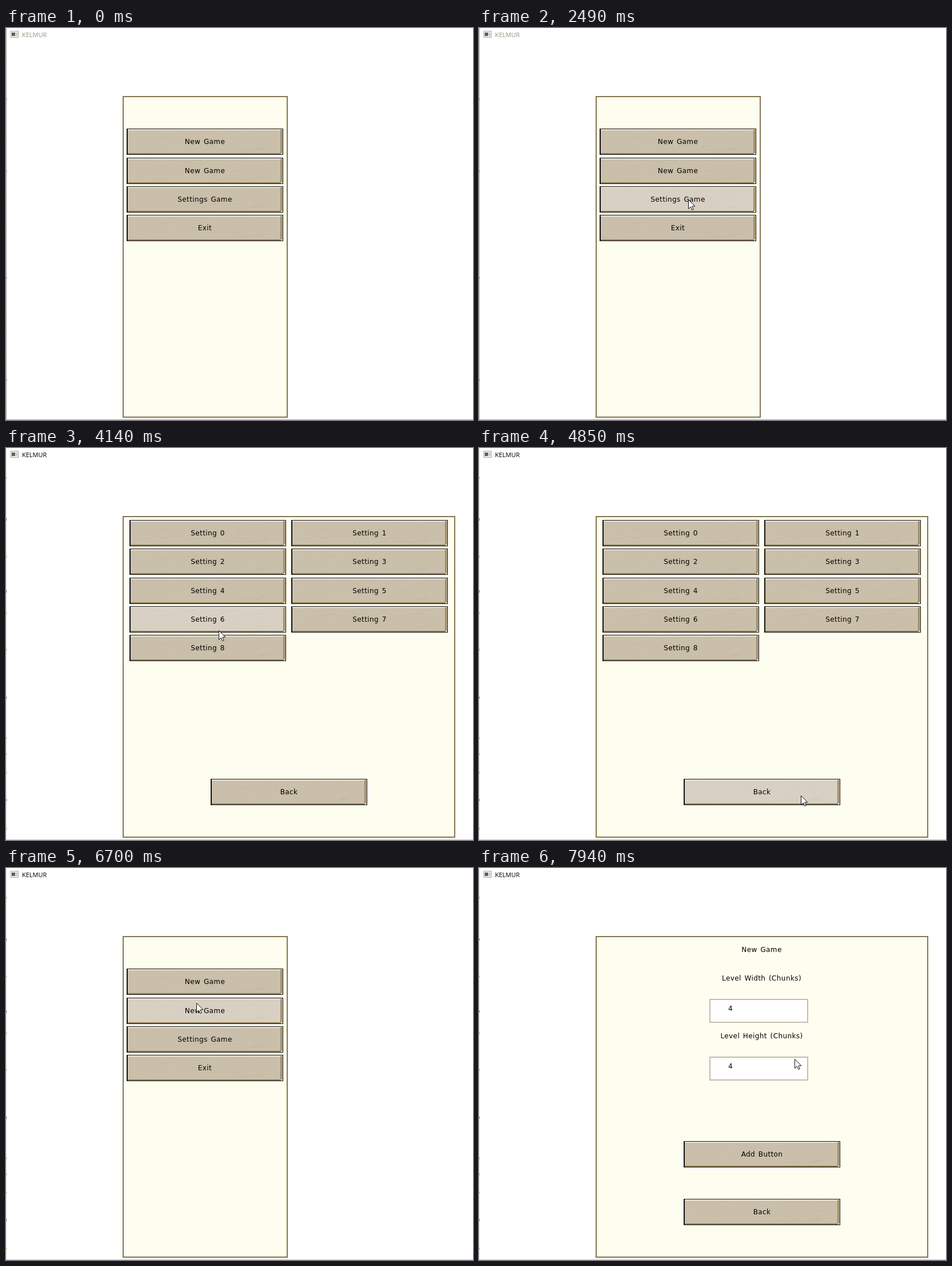
An HTML page with a canvas that plays this animation: 817x686 px, repeating every 7.99 s.

```html
<!DOCTYPE html>
<html lang="en">
<head>
<meta charset="utf-8">
<title>Game menu</title>
<style>
  html, body { margin: 0; width: 100%; height: 100%; overflow: hidden; background: #fff; }
  canvas { display: block; }
</style>
</head>
<body>
<canvas id="stage" width="817" height="686"></canvas>
<script>
const LOOP = 7990;
const FOCUS = 2630, OPEN_SETTINGS = 3880, GO_BACK = 5370, OPEN_NEW_GAME = 7110;
const BUTTON_W = 274, BUTTON_H = 46;
const MENU_X = 211, LEFT_X = 216, RIGHT_X = 499, CENTER_X = 358;
const ctx = document.getElementById('stage').getContext('2d');

function seeded(seed) {
  return () => (seed = seed * 16807 % 2147483647) / 2147483647;
}

function rect(c, color, x, y, w, h) {
  c.fillStyle = color;
  c.fillRect(x, y, w, h);
}

function label(text, x, y) {
  ctx.font = '12px "DejaVu Sans", sans-serif';
  ctx.letterSpacing = '0.4px';
  ctx.wordSpacing = '1.5px';
  ctx.textAlign = 'center';
  ctx.fillStyle = '#000';
  ctx.fillText(text, x, y);
}

// Wooden plate with black outline and bevelled right and bottom edges.
function makePlate(wood, grain) {
  const plate = document.createElement('canvas');
  plate.width = BUTTON_W;
  plate.height = BUTTON_H;
  const c = plate.getContext('2d');
  const random = seeded(7);
  const right = BUTTON_W - 5, bottom = BUTTON_H - 3;

  rect(c, '#111', 0, 0, BUTTON_W, BUTTON_H);
  rect(c, wood, 2, 1, BUTTON_W - 3, BUTTON_H - 2);
  c.strokeStyle = grain;
  for (let i = 0; i < 80; i++) {
    const x = 4 + random() * 245, y = 5 + random() * 37, length = 5 + random() * 15;
    c.globalAlpha = 0.05 + random() * 0.15;
    c.beginPath();
    c.moveTo(x, y);
    c.lineTo(x + length, y - length * 0.1);
    c.stroke();
  }
  c.globalAlpha = 1;
  rect(c, '#e9e4d9', 2, 1, BUTTON_W - 4, 2);
  rect(c, '#8c7950', 2, bottom, BUTTON_W - 4, 2);
  rect(c, '#a08d69', right, 2, 3, BUTTON_H - 4);
  rect(c, '#f4f0e4', right + 1, bottom, 2, 2);
  return plate;
}

const plainPlate = makePlate('#cabfaa', '#b3a68d');
const hoverPlate = makePlate('#d8d0c2', '#c3b9a8');

function button(text, x, row, pointer) {
  const y = Math.floor(126.5 + 50.33 * row);
  const hovered = pointer && pointer.x >= x && pointer.x < x + BUTTON_W &&
    pointer.y >= y && pointer.y < y + BUTTON_H;
  ctx.drawImage(hovered ? hoverPlate : plainPlate, x, y);
  label(text, x + BUTTON_W / 2, y + 27);
}

function panel(width) {
  rect(ctx, '#85754f', 204, 119, width, 563);
  rect(ctx, '#fefef0', 206, 121, width - 4, 559);
}

function input(caption, value, y) {
  label(caption, 494.5, y - 32);
  rect(ctx, '#c4bbae', 403, y, 173, 42);
  rect(ctx, '#fff', 405, y + 2, 169, 38);
  label(value, 440, y + 21);
}

function mainMenu(pointer) {
  panel(289);
  ['New Game', 'New Game', 'Settings Game', 'Exit'].forEach(
    (text, i) => button(text, MENU_X, i + 1, pointer));
}

function settings(pointer) {
  panel(582);
  for (let i = 0; i < 9; i++)
    button('Setting ' + i, i % 2 ? RIGHT_X : LEFT_X, Math.floor(i / 2), pointer);
  button('Back', CENTER_X, 9, pointer);
}

function newGame(pointer) {
  panel(582);
  label('New Game', 494.5, 147);
  input('Level Width (Chunks)', '4', 229);
  input('Level Height (Chunks)', '4', 330);
  button('Add Button', CENTER_X, 7, pointer);
  button('Back', CENTER_X, 9, pointer);
}

function windowFrame(focused) {
  rect(ctx, '#fff', 0, 0, 817, 686);
  rect(ctx, focused ? '#e4e4e4' : '#a6a6a6', 0, 0, 1, 686);
  rect(ctx, focused ? '#c4c4c4' : '#a0a0a0', 0, 685, 817, 1);
  // Slivers of what lies behind the left edge
  const random = seeded(21);
  for (let y = 50; y < 670; y += 20 + random() * 70)
    rect(ctx, random() < 0.4 ? '#c0a050' : '#666', 0, Math.round(y), 1, 4);

  rect(ctx, '#a9aaa9', 8, 5, 14, 12);
  rect(ctx, '#eeeeec', 9, 6, 12, 10);
  rect(ctx, '#59625b', 10, 8, 6, 6);
  rect(ctx, '#c9cdca', 17, 8, 3, 6);
  ctx.font = '11px "Open Sans", sans-serif';
  ctx.letterSpacing = ctx.wordSpacing = '0px';
  ctx.textAlign = 'left';
  ctx.fillStyle = focused ? '#000' : '#969684';
  ctx.fillText('KELMUR', 28, 16);
}

// Pointer strokes: each eases from the last resting place to a new one;
// bow bends the stroke sideways at its middle.
const entry = { x: 797, y: 684 };
const strokes = [
  { from: 160, to: 460, x: 604, y: 356 },
  { from: 670, to: 1420, x: 315, y: 194 },
  { from: 1490, to: 2020, x: 364, y: 345 },
  { from: 2160, to: 2660, x: 366, y: 294 },
  { from: 3120, to: 3860, x: 307, y: 285 },
  { from: 4090, to: 4850, x: 563, y: 608, bow: { x: 80, y: -20 } },
  { from: 5400, to: 6140, x: 340, y: 274 },
  { from: 6170, to: 6470, x: 333, y: 236 },
  { from: 6700, to: 7020, x: 343, y: 207 },
  { from: 7510, to: 7940, x: 552, y: 334, bow: { x: 50, y: 325 } }
];

function pointerAt(time) {
  if (time < strokes[0].from) return null;
  const i = strokes.findLastIndex(s => s.from <= time);
  const end = strokes[i], start = strokes[i - 1] || entry;
  const u = Math.min(1, (time - end.from) / (end.to - end.from));
  const eased = u * (2 - u);
  const along = axis => Math.round(start[axis] + (end[axis] - start[axis]) * eased +
    (end.bow ? end.bow[axis] * Math.sin(Math.PI * eased) : 0));
  return { x: along('x'), y: along('y') };
}

const arrow = new Path2D('M.5 .5V16.5L4.3 13L6.8 18.5L9.2 17.5L6.8 12H11.8Z');

function drawPointer({ x, y }) {
  ctx.save();
  ctx.translate(x, y);
  ctx.fillStyle = '#fff';
  ctx.strokeStyle = '#111';
  ctx.fill(arrow);
  ctx.stroke(arrow);
  ctx.restore();
}

function draw(time) {
  const pointer = pointerAt(time);
  windowFrame(time >= FOCUS);
  if (time < OPEN_SETTINGS) mainMenu(pointer);
  else if (time < GO_BACK) settings(pointer);
  else if (time < OPEN_NEW_GAME) mainMenu(pointer);
  else newGame(pointer);
  if (pointer) drawPointer(pointer);
}

const start = performance.now();
function tick() {
  draw((performance.now() - start) % LOOP);
  requestAnimationFrame(tick);
}
tick();
</script>
</body>
</html>
```
